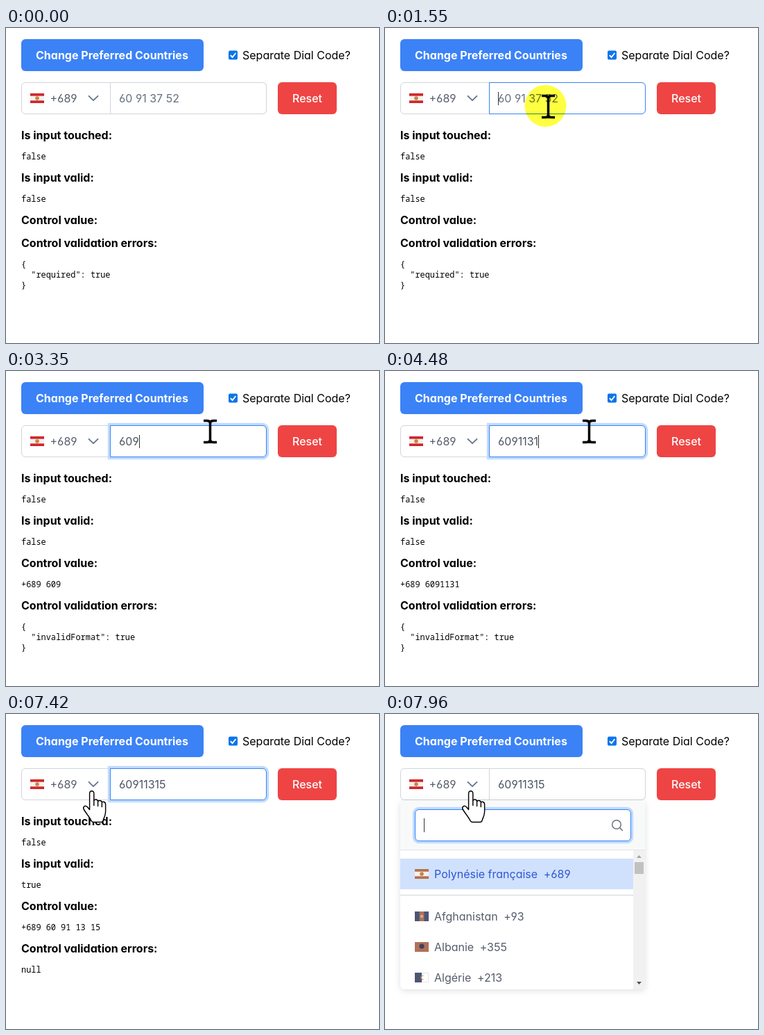
An HTML page that plays this animation: 538 px wide and 453 px high, repeating every 8000 ms.

```html
<!DOCTYPE html>
<html lang="en">
<head>
<meta charset="utf-8">
<title>Phone input demo</title>
<style>
html, body { margin: 0; width: 100%; height: 100%; overflow: hidden; background: #fff; }
svg { display: block; width: 538px; height: 453px; }
text { font: 16px Inter, sans-serif; font-feature-settings: "cv02", "cv03", "cv04", "cv11"; white-space: pre; }
.bold { font-weight: 700; }
.mono { font: 11.9px "Noto Sans Mono", monospace; }
.white { fill: #fff; }
.reset { fill: #fff; font-weight: 450; }
.muted { fill: #667080; }
.value { fill: #4b5563; }
.item { fill: #565c6b; }
.picked { fill: #3157d3; }
#panel { filter: drop-shadow(0 2px 5px rgba(0, 0, 0, .12)); }
#halo { mix-blend-mode: multiply; }
</style>
</head>
<body>
<svg viewBox="0 0 538 453">
  <defs>
    <path id="field-shape" d="M150.5 78.5H370a5.5 5.5 0 0 1 5.5 5.5V118a5.5 5.5 0 0 1-5.5 5.5H150.5Z"/>
    <rect id="search-shape" x="43.5" y="137.5" width="311" height="45" rx="5.5"/>
  </defs>

  <rect x="22" y="16" width="263" height="46" rx="6" fill="#3b82f6"/>
  <text class="bold white" x="43" y="45">Change Preferred Countries</text>
  <rect x="321" y="32.5" width="13" height="13" rx="2" fill="#0b75ea"/>
  <path d="M323.8 39.2 326.6 42 331.4 36" fill="none" stroke="#fff" stroke-width="1.9"/>
  <text x="341" y="45">Separate Dial Code?</text>
  <rect x="392" y="78" width="85" height="46" rx="6" fill="#ef4444"/>
  <text class="reset" x="413" y="107">Reset</text>

  <g id="status"></g>
  <g id="errors"></g>

  <rect x="22.5" y="78.5" width="353" height="45" rx="5.5" fill="#fff" stroke="#d1d5db"/>
  <use id="ring" href="#field-shape" fill="none" stroke="#bfdbfe" stroke-width="7.4"/>
  <use id="box" href="#field-shape" fill="#fff"/>
  <g id="flag"></g>
  <text class="item" x="63.5" y="107">+689</text>
  <path d="M119.5 97.8 126 104.2 132.5 97.8" fill="none" stroke="#64748b" stroke-width="1.8" stroke-linecap="round" stroke-linejoin="round"/>
  <text x="163" y="107" id="field"></text>
  <rect id="caret" y="92" width="1" height="19" fill="#333"/>

  <g id="panel">
    <rect x="22" y="124" width="353" height="272" rx="6" fill="#fff"/>
    <path d="M22 195.5V130a6 6 0 0 1 6-6H369a6 6 0 0 1 6 6V195.5Z" fill="#f8faf9"/>
    <path d="M22 195.5H375" stroke="#e1e4e8"/>
    <use href="#search-shape" fill="none" stroke="#bfdbfe" stroke-width="7.4"/>
    <use href="#search-shape" fill="#fff" stroke="#3b82f6"/>
    <rect x="56" y="150" width="1" height="20" fill="#333"/>
    <path d="M340.3 159a6.3 6.3 0 1 0-12.6 0a6.3 6.3 0 1 0 12.6 0M338.7 163.7 342.5 167.5" fill="none" stroke="#6b7280" stroke-width="1.5" stroke-linecap="round"/>
    <rect x="22" y="208" width="336" height="44" fill="#d0e1fd"/>
    <path d="M22 260.5H358" stroke="#d1d5db"/>
    <path d="M358 196H375V390a6 6 0 0 1-6 6H358Z" fill="#f1f1f1"/>
    <rect x="360" y="213" width="13" height="17" fill="#c1c1c1"/>
    <path d="M363 207h7l-3.5-4z" fill="#a3a3a3"/>
    <path d="M363 385h7l-3.5 4z" fill="#505050"/>
    <g id="list"></g>
  </g>

  <circle id="halo" r="30" fill="#ffff42"/>
  <g id="cursor" stroke="#000">
    <g id="beam" fill="none" stroke-width="3.5">
      <path id="serif" d="M-9.5-15.5H-5Q0-15.5 0-12Q0-15.5 5-15.5H9.5"/>
      <use href="#serif" transform="scale(1 -1)"/>
      <path d="M0-13V13"/>
    </g>
    <path id="arrow" d="M0 0V25L5.8 19.5 9.7 28.5 13.7 26.8 9.9 18H18Z" fill="#fff" stroke-width="1.5"/>
    <g id="hand" transform="translate(-13 0) scale(.96 1)" stroke-width="1.5" stroke-linejoin="round" stroke-linecap="round">
      <path fill="#fff" d="M10.5 5C10.5 0 17 0 17 5V15C18 12.5 23 13 23 16.5C24 14 29 14.5 29 18C30 16 34.5 16.5 34.5 20.5V31C34.5 36 32 40 31 43Q30.5 46 28 46H16Q14 46 12.5 43C10 38 5 33 2 28C-.5 24 4 21 7 24L10.5 28Z"/>
      <path fill="none" d="M17 15V22M23 17V23M29 19V24"/>
    </g>
  </g>
</svg>
<script>
const LOOP = 8000, STEP = 68, BLINK = 515;
const FOCUS = 1550, BLUR = 7620, OPEN = 7790;
const NUMBER = "60911315";
const HINT = "60 91 37 52";
const ENTER = 200, START = [440, 425];

// Keys are pressed two at a time.
const keyTimes = [2720, 3350, 4020, 4480].flatMap(t => [t, t + 120]);

const glides = [
  { from: ENTER, to: 700, x: 205, y: 215 },
  { from: 700, to: 1020, x: 235.5, y: 113 },
  { from: 1700, to: 2090, x: 294.5, y: 87 },
  { from: 6300, to: 6390, x: 227, y: 91 },
  { from: 6390, to: 6690, x: 237, y: 111 },
  { from: 7070, to: 7415, x: 123.5, y: 109.5 }
];

const $ = id => document.getElementById(id);
const clamp = v => Math.min(1, Math.max(0, v));
const ease = p => (1 - Math.cos(Math.PI * p)) / 2;
const within = (t, a, b) => t >= a && t < b;
const show = (id, on) => $(id).setAttribute("visibility", on ? "visible" : "hidden");
const setText = (el, s) => { if (el.textContent !== s) el.textContent = s; };
const label = (cls, y, s = "", x = 22) => `<text class="${cls}" x="${x}" y="${y}">${s}</text>`;
const rect = (x, y, w, h, fill) => `<rect x="${x}" y="${y}" width="${w}" height="${h}" fill="${fill}"/>`;
const dot = (x, y, r, fill) => `<circle cx="${x}" cy="${y}" r="${r}" fill="${fill}"/>`;

// Flags are 20 by 14, placed by their top left corner.
const polynesia = (x, y, red, gold) =>
  rect(x, y, 20, 14, "#f5f1ee") + rect(x, y, 20, 3.7, red) +
  rect(x, y + 10.3, 20, 3.7, red) + dot(x + 10, y + 7, 2.8, gold);
const NAVY = "#4b5674", RUST = "#b0705a";
const countries = [
  ["Afghanistan", "+93", (x, y) => rect(x, y, 20, 14, NAVY) + rect(x + 6.7, y, 6.7, 14, RUST) + dot(x + 10, y + 7, 2.3, "#d0a796")],
  ["Albanie", "+355", (x, y) => rect(x, y, 20, 14, RUST) + dot(x + 10, y + 6, 3.6, "#40405a")],
  ["Algérie", "+213", (x, y) => rect(x, y, 20, 14, "#e3e5ea") + rect(x + 1, y + 1, 18, 12, "#fff") +
    rect(x, y, 10, 14, NAVY) + dot(x + 11, y + 7, 3, RUST) + dot(x + 12.3, y + 7, 2.5, "#fff")]
];

function option([name, dial, flag], y, cls) {
  const text = `${name}<tspan dx="8.5">${dial}</tspan>`;
  return flag(43, y - 13) + label(cls, y, text, 71);
}

function build() {
  $("status").innerHTML = ["Is input touched:", "Is input valid:", "Control value:"]
    .map((s, i) => label("bold", 160 + 61 * i, s) + label("mono", 189 + 61 * i)).join("");
  $("errors").innerHTML = label("bold", 315, "Control validation errors:") +
    [0, 1, 2].map(i => label("mono", 344 + 15 * i)).join("");
  $("flag").innerHTML = polynesia(35, 94, "#d0262c", "#c98440");
  const first = ["Polynésie française", "+689", (x, y) => polynesia(x, y, "#b5714f", "#c98442")];
  $("list").innerHTML = option(first, 236, "picked") +
    countries.map((c, i) => option(c, 297 + 44 * i, "item")).join("");
}
build();
const [touched, valid, control] = $("status").querySelectorAll(".mono");
const errorLines = [...$("errors").querySelectorAll(".mono")];

// The pointer moves in small jumps along each glide.
function pointAt(t) {
  let [x, y] = START;
  for (const g of glides) {
    if (t < g.from) break;
    const jumps = Math.floor((t - g.from) / STEP) + 1;
    const p = t >= g.to ? 1 : ease(clamp(jumps * STEP / (g.to - g.from)));
    x += (g.x - x) * p;
    y += (g.y - y) * p;
  }
  return [x, y];
}

function drawForm(t, hover) {
  const pressed = keyTimes.filter(k => k <= t);
  const typed = NUMBER.slice(0, pressed.length);
  const done = typed === NUMBER;
  const shown = done ? typed.match(/../g).join(" ") : typed;
  const error = typed ? "invalidFormat" : "required";
  const lines = done ? ["null", "", ""] : ["{", `  "${error}": true`, "}"];

  setText($("field"), typed || HINT);
  $("field").setAttribute("class", typed ? "value" : "muted");
  setText(touched, "false");
  setText(valid, String(done));
  setText(control, typed && "+689 " + shown);
  errorLines.forEach((el, i) => setText(el, lines[i]));
  $("errors").setAttribute("transform", `translate(0 ${typed ? 28 : 0})`);

  const focused = within(t, FOCUS, BLUR);
  $("box").setAttribute("stroke", focused || hover ? "#3b82f6" : "#d1d5db");
  $("ring").setAttribute("opacity", clamp((t - FOCUS) / 150) * (1 - clamp((t - BLUR) / 150)));
  const width = typed ? $("field").getComputedTextLength() : 0;
  $("caret").setAttribute("x", Math.round(163 + width));
  const lastKey = pressed.length ? pressed[pressed.length - 1] : FOCUS;
  show("caret", focused && Math.floor((t - lastKey) / BLINK) % 2 === 0);
}

function drawPanel(t) {
  const p = 1 - (1 - clamp((t - OPEN) / 160)) ** 2;
  show("panel", p > 0);
  $("panel").setAttribute("opacity", p);
  $("panel").setAttribute("transform", `translate(0 124) scale(1 ${0.8 + 0.2 * p}) translate(0 -124)`);
}

function drawPointer(t, x, y, overField) {
  const overSelect = x < 150;
  show("beam", t >= ENTER && overField);
  show("hand", overSelect);
  show("arrow", t >= ENTER && !overField && !overSelect);
  $("cursor").setAttribute("transform", `translate(${x} ${y})`);
  show("halo", [FOCUS, BLUR].some(click => within(t, click, click + 150)));
  $("halo").setAttribute("transform", `translate(${x - 4} ${y - 1})`);
}

function frame() {
  const t = performance.now() % LOOP;
  const [x, y] = pointAt(t);
  const overField = x >= 150 && x <= 376 && y >= 78 && y <= 124;
  drawForm(t, overField);
  drawPanel(t);
  drawPointer(t, x, y, overField);
  requestAnimationFrame(frame);
}
frame();
</script>
</body>
</html>
```
